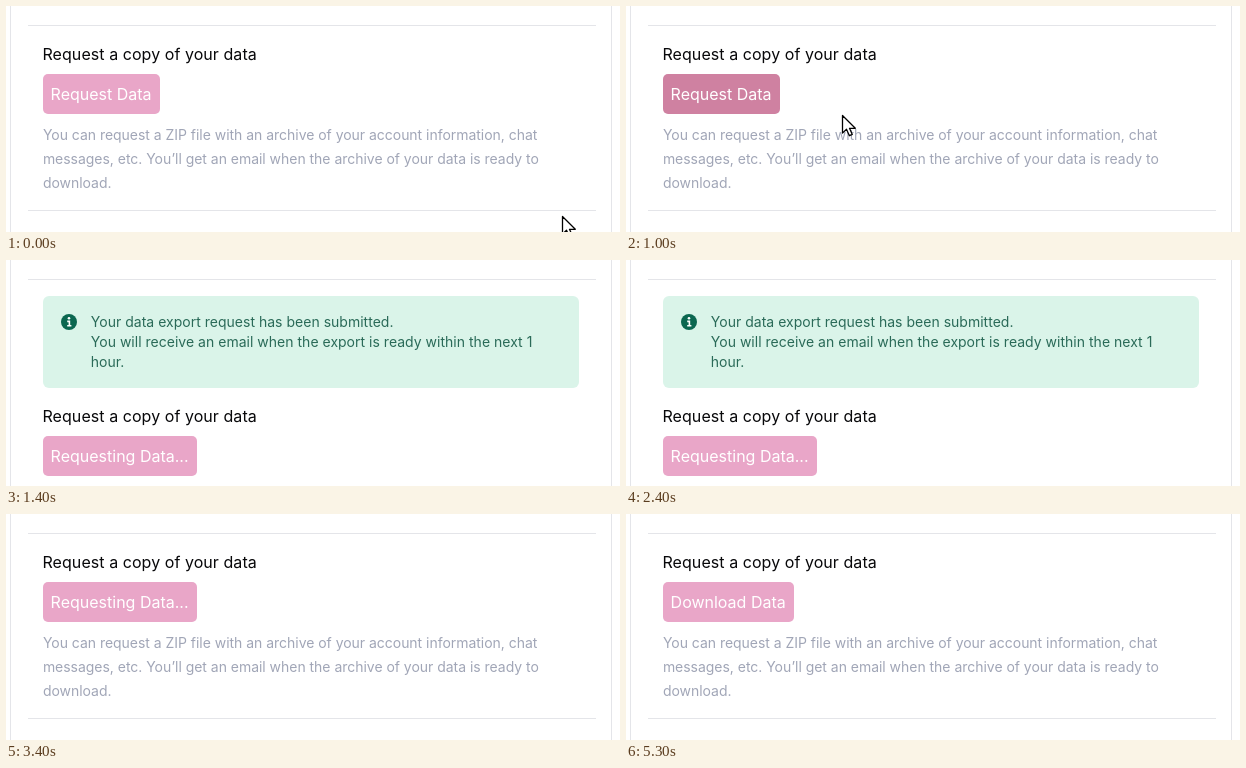
An HTML page that plays this animation: 614 by 226 pixels, repeating every 5700 ms.

```html
<!DOCTYPE html>
<html lang="en">
<head>
<meta charset="utf-8">
<title>Request data</title>
<style>
  html, body { margin: 0; width: 100%; height: 100%; overflow: hidden; background: #fff; }
  svg { display: block; width: 614px; height: 226px; }
  text { font: 16px Inter, "Open Sans", sans-serif; font-optical-sizing: none; white-space: pre; }
  .title { letter-spacing: .06px; fill: #08080a; }
  .note { font-size: 14px; letter-spacing: -.03px; fill: #a1a6b7; }
  .alert { font-size: 14px; letter-spacing: .015px; fill: #2a6a58; }
  .rule { fill: #e4e5e9; }
  .cursor { fill: #fff; stroke: #000; stroke-width: 1.3; stroke-linejoin: round; }
</style>
</head>
<body>
<svg viewBox="0 0 614 226">
  <rect class="rule" x="4" width="1" height="226"/>
  <rect class="rule" x="605" width="1" height="226"/>
  <rect class="rule" x="22" y="19" width="568" height="1"/>

  <g id="banner">
    <rect x="37" y="36" width="536" height="92" rx="6" fill="#daf4e9"/>
    <circle cx="63" cy="62" r="8" fill="#0b6750"/>
    <circle cx="63" cy="58.2" r="1.3" fill="#fff"/>
    <path d="M61.2 61.4H63.4V65.8M61.2 65.8H65.4" fill="none" stroke="#fff" stroke-width="1.6"/>
    <text class="alert" x="84.8" y="67">Your data export request has been submitted.</text>
    <text class="alert" x="84.8" y="87">You will receive an email when the export is ready within the next 1</text>
    <text class="alert" x="84.8" y="107">hour.</text>
  </g>

  <g id="panel">
    <text class="title" x="36.5" y="54">Request a copy of your data</text>
    <rect id="button" x="37" y="68" height="40" rx="5"/>
    <text id="label" x="44.6" y="94" fill="#fff"></text>
    <text class="note" x="36.9" y="134">You can request a ZIP file with an archive of your account information, chat</text>
    <text class="note" x="36.9" y="158">messages, etc. You’ll get an email when the archive of your data is ready to</text>
    <text class="note" x="36.9" y="182">download.</text>
    <rect class="rule" x="22" y="204" width="568" height="1"/>
  </g>

  <path id="arrow" class="cursor" d="M0 0V17.6L4 13.8L6.9 20.2L9.8 18.9L7 12.8H12.8Z"/>
  <g id="hand" class="cursor">
    <path d="M-1.9 11.5V1.6Q-1.9 0 -.2 0T1.5 1.6V7.2Q1.7 6 3 6T4.6 7.5Q5 6.6 6.2 6.7T7.7 8.3Q8.2 7.5 9.3 7.8T10.5 9.5V14Q10.5 16.4 8.7 18.6V21.5H-.7V19.6Q-2.6 17.2 -4 14.2Q-5.9 11.6 -5.6 10.4Q-4.6 8.6 -1.9 11.5Z"/>
    <path d="M1.5 7V10.5M4.6 7.6V10.8M7.7 8.4V11.2" fill="none"/>
  </g>
</svg>
<script>
const LOOP = 5700, STEP = 100;
const SUBMIT = 1400, DISMISS = 2800, READY = 3800;
const REST = [556, 210], PRESS = [127, 90], EXIT = [470, 162];
const PINK = [233, 166, 200], HOVER = [200, 120, 151];

const $ = id => document.getElementById(id);
const progress = (t, from, to) => Math.min(1, Math.max(0, (t - from) / (to - from)));
const smooth = u => u * u * (3 - 2 * u);
const mix = (a, b, u) => a.map((v, i) => Math.round(v + (b[i] - v) * u));
const show = (el, on) => el.setAttribute('visibility', on ? 'visible' : 'hidden');

function pointer(t) {
  return t < 900
    ? mix(REST, PRESS, smooth(progress(t, 0, 700)))
    : mix(PRESS, EXIT, smooth(progress(t, 900, 1200)));
}

function drawButton(t) {
  const [text, width] = t < SUBMIT ? ['Request Data', 117]
    : t < READY ? ['Requesting Data...', 154]
    : ['Download Data', 131];
  const hover = progress(t, 500, 700) - progress(t, 900, SUBMIT);
  if ($('label').textContent !== text) $('label').textContent = text;
  $('button').setAttribute('width', width);
  $('button').setAttribute('fill', `rgb(${mix(PINK, HOVER, hover)})`);
}

function drawPointer(t) {
  const [x, y] = pointer(t);
  const over = x >= 37 && x < 154 && y >= 68 && y < 108;
  const active = t <= 1200;
  show($('hand'), active && over);
  show($('arrow'), active && !over);
  $(over ? 'hand' : 'arrow').setAttribute('transform', `translate(${x + .5} ${y + .5})`);
}

function draw(now) {
  const t = Math.floor(now % LOOP / STEP) * STEP;
  const alert = t >= SUBMIT && t < DISMISS;
  show($('banner'), alert);
  $('panel').setAttribute('transform', `translate(0 ${alert ? 108 : 0})`);
  drawButton(t);
  drawPointer(t);
}

const start = performance.now();
function tick() {
  draw(performance.now() - start);
  requestAnimationFrame(tick);
}
tick();
</script>
</body>
</html>
```
